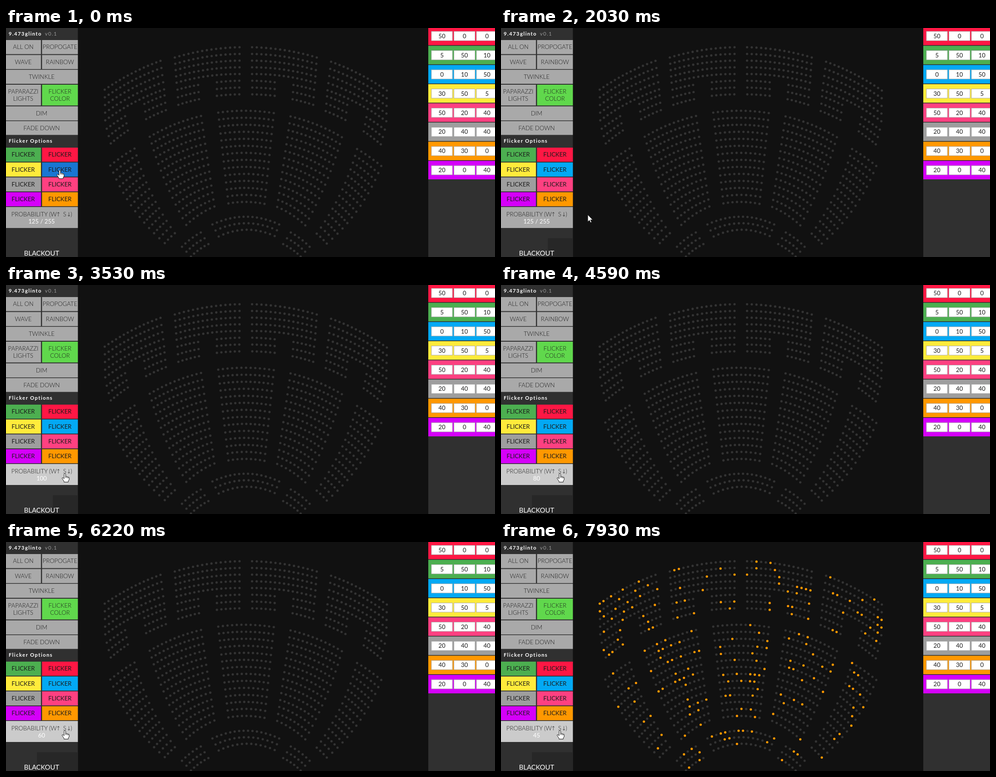
Animation of 1092x513 px, one loop 8000 ms. Source, as an HTML page with a canvas:

```html
<!DOCTYPE html>
<html lang="en">
<head>
<meta charset="utf-8">
<title>Seat lights</title>
<style>
  html, body { margin: 0; width: 100%; height: 100%; overflow: hidden; background: #111; }
  canvas, svg { position: absolute; left: 0; top: 0; width: 1092px; height: 513px; }
  text { font: 13.33px Lato, "Open Sans", sans-serif; fill: #1c1c1c; }
  .mid { text-anchor: middle; }
  .thin { font-weight: 300; }
  .head { font-size: 11.5px; font-weight: 700; letter-spacing: 1.4px; fill: #fff; }
  .version { font-weight: 400; fill: #999; }
  .white { fill: #fff; }
  .big { font-size: 15px; }
  .arrow { font-family: "DejaVu Sans", sans-serif; font-size: 13px; }
</style>
</head>
<body>
<canvas id="seats" width="1092" height="513"></canvas>
<svg id="ui" viewBox="0 0 1092 513">
  <rect width="160.5" height="513" fill="#303030"/>
  <rect x="943" width="149" height="513" fill="#303030"/>
  <rect id="shade" y="471" height="42" fill="#272727"/>
  <text class="head" x="6" y="16.5">9.473glinto</text>
  <text class="head version" x="87" y="16.5">v0.1</text>
  <text class="head" x="6" y="257">Flicker Options</text>
  <g id="panel"></g>
  <text class="thin" x="12" y="421.5">PROBABILITY (W</text>
  <text class="thin mid arrow" x="117" y="421.5">↑</text>
  <text class="thin mid" x="131" y="421.5">S</text>
  <text class="thin mid arrow" x="140.5" y="421.5">↓</text>
  <text class="thin mid" x="146" y="421.5">)</text>
  <text id="level" class="mid white" x="79.5" y="438"></text>
  <text class="mid white big" x="79.5" y="509.5">BLACKOUT</text>
  <g id="cursor" stroke="#111" fill="#fff" stroke-linejoin="round">
    <path id="hand" d="M-1.7 1.5Q0-1 1.7 1.5V7Q3.5 5.8 4.6 7.6Q6.4 6.6 7.2 8.4Q9.4 7.6 9.6 10V14L7.6 17V19.5H-2V17.5L-6.2 11.5Q-6.4 8.8-3.8 10L-1.7 12ZM1.7 7V10M4.6 8V10.5M7.2 9V11"/>
    <path id="pointer" stroke-width=".8" d="M0 0V15.5L3.6 12.2L6 17.6L8.4 16.6L6 11.4H11Z"/>
  </g>
</svg>
<script>
const LOOP = 8000;
const $ = id => document.getElementById(id);
const panel = $("panel");

function add(tag, attrs, label) {
  const el = document.createElementNS("http://www.w3.org/2000/svg", tag);
  for (const key in attrs) el.setAttribute(key, attrs[key]);
  if (label !== undefined) el.textContent = label;
  return panel.appendChild(el);
}
const box = (x, y, width, height, fill) => add("rect", { x, y, width, height, fill });
const label = (text, x, y, cls = "") => add("text", { x, y: y + 4.7, class: "mid " + cls }, text);

// Side panel buttons
const GREY = "#a9a9a9";
function button(lines, col, y, h, fill = GREY, cls = "thin") {
  const [x, w, mid] = [[0, 78, 38.5], [80.5, 80, 120.5], [0, 160.5, 79.5]][col];
  const rect = box(x, y, w, h, fill);
  lines.forEach((s, i) => label(s, mid, y + h / 2 + (i - (lines.length - 1) / 2) * 15.2, cls));
  return { rect, fill, x, y, w, h };
}
button(["ALL ON"], 0, 27, 31.5);
button(["PROPOGATE"], 1, 27, 31.5);
button(["WAVE"], 0, 60.5, 31.5);
button(["RAINBOW"], 1, 60.5, 31.5);
button(["TWINKLE"], 2, 93.5, 31.5);
button(["PAPARAZZI", "LIGHTS"], 0, 127, 46.5);
button(["FLICKER", "COLOR"], 1, 127, 46.5, "#60d84c");
button(["DIM"], 2, 175.5, 31.5);
button(["FADE DOWN"], 2, 208.5, 31);

const flick = (row, col, fill, hover) =>
  ({ ...button(["FLICKER"], col, 268 + row * 33.3, 31.5, fill, ""), hover });
const targets = [
  flick(0, 0, "#4caf50"), flick(0, 1, "#ff1744"),
  flick(1, 0, "#ffeb3b"), flick(1, 1, "#03a9f4", "#1976d2"),
  flick(2, 0, "#9e9e9e"), flick(2, 1, "#ff4081", "#f50057"),
  flick(3, 0, "#d500f9"), flick(3, 1, "#ff9800", "#f57c00"),
  { ...button([], 2, 401, 47), hover: "#cbcbcb" }
];

// Colour mixer on the right
[
  ["#ff1744", 50, 0, 0], ["#4caf50", 5, 50, 10], ["#03a9f4", 0, 10, 50], ["#ffeb3b", 30, 50, 5],
  ["#ff4081", 50, 20, 40], ["#9e9e9e", 20, 40, 40], ["#ff9800", 40, 30, 0], ["#d500f9", 20, 0, 40]
].forEach(([fill, ...parts], i) => {
  const y = i * 42.95 - 3;
  box(943, y, 149, 41.4, fill);
  parts.forEach((n, k) => {
    const x = 950 + k * 50.3;
    box(x, y + 10.7, 47, 20.6, "#fff").setAttribute("stroke", "#aaa");
    label(n, x + 23.5, y + 21);
  });
});

// Seats: curved rows around a stage centre, mirrored left to right
const seats = [];
const AXIS = 535.5;
function row(x0, y0, x1, y1, drop = 0, mirror = true) {
  const dx = x1 - x0, dy = y1 - y0, len = Math.hypot(dx, dy);
  const radius = Math.hypot((x0 + x1) / 2 - AXIS, (y0 + y1) / 2 - 600);
  const sag = len * len / (8 * radius);
  const gaps = Math.round(len / 10.2);
  for (let i = 0; i <= gaps; i++) {
    const u = i / gaps, bulge = 4 * u * (1 - u) * sag;
    const x = x0 + dx * u + dy / len * bulge;
    const y = y0 + dy * u - dx / len * bulge;
    seats.push([x, y]);
    if (mirror) seats.push([2 * AXIS - x, y + drop]);
  }
}
const rows = (n, make) => { for (let i = 0; i < n; i++) make(i); };

rows(5, i => {
  row(377 + i, 66 + 14.1 * i, 521.5, 43 + 15 * i);
  row(220.5 + .3 * i, 138 + 17.2 * i, 345 + 2 * i, 73.5 + 16 * i, 2);
});
rows(3, i => {
  row(383 + i, 138 + 17 * i, 429 + i, 127.5 + 16 * i);
  row(471, 121.5 + 15.2 * i, 521, 118 + 15.3 * i);
  row(225 + 4.5 * i, 225.5 + 16.5 * i, 266 + 3 * i, 197.5 + 16 * i, 2);
  row(309 + 2 * i, 170 + 17 * i, 354 + 1.5 * i, 151 + 16.5 * i, 2);
  row(393 + 10 * i, 490 + 11 * i, 435 + 8.5 * i, 458 + 13 * i);
  row(461 + 7 * i, 440 + 13.5 * i, 610 - 5 * i, 440 + 13 * i, 0, false);
});
rows(14, i => {
  const q = i * i;
  row(474 + 1.75 * i, 189.5 + 15.65 * i, 598 - 1.6 * i, 190.5 + 15.65 * i, 0, false);
  row(321 + 4.2 * i + .16 * q, 243.5 + 15.2 * i, 435.5 + 2.3 * i, 197 + 15.6 * i, 1);
  row(233 + 6.3 * i + .235 * q, 308 + 16.1 * i - .21 * q,
      287 + 4.2 * i + .21 * q, 270 + 15.5 * i - .07 * q, 1);
});

// Timeline
const toggles = [
  1030, 1180, 1340, 1520, 1740, 1930, 2120, 2300, 2460, 2700, 2880, 3090, 3280,
  3530, 3640, 3850, 4060, 4260, 4440, 4590, 4840, 5020, 5240, 5420, 5630, 5780,
  6020, 6220, 6370, 6580, 6790, 6940, 7170, 7330, 7560, 7770, 7930
];
const levels = [[0, 125], [2990, 100], [4440, 80], [5900, 60], [7420, 45]];
const path = [
  [0, 120, 318], [30, 120, 318], [250, 120, 378], [1030, 120, 378], [1340, 360, 405],
  [1600, 360, 405], [2080, 175, 420], [2240, 131.5, 422], [LOOP, 131.5, 422]
];

function cursorAt(t) {
  const k = path.findIndex(p => p[0] > t);
  const [a, b] = [path[k - 1], path[k]];
  const u = (t - a[0]) / (b[0] - a[0]);
  return [a[1] + (b[1] - a[1]) * u, a[2] + (b[2] - a[2]) * u];
}

function random(a, b) {
  let h = Math.imul(a + 1, 0x9e3779b1) ^ Math.imul(b + 7, 0x85ebca6b);
  h = Math.imul(h ^ h >>> 15, 0x2c1b3c6d);
  h = Math.imul(h ^ h >>> 13, 0x297a2d39);
  return ((h ^ h >>> 16) >>> 0) / 2 ** 32;
}

const ctx = $("seats").getContext("2d");
function drawSeats(flash, chance) {
  ctx.fillStyle = "#111";
  ctx.fillRect(0, 0, 1092, 513);
  seats.forEach(([x, y], i) => {
    const lit = flash % 2 && random(i, flash) < chance;
    ctx.fillStyle = lit ? "#ff9800" : "#333";
    ctx.beginPath();
    ctx.arc(x, y, 2.6, 0, 2 * Math.PI);
    ctx.fill();
  });
}

function frame() {
  const t = performance.now() % LOOP;
  const level = levels.filter(l => l[0] <= t).pop()[1];
  drawSeats(toggles.filter(s => s <= t).length, level / 255);
  $("level").textContent = level === 125 ? "125 / 255" : level;

  const [x, y] = cursorAt(t);
  $("cursor").setAttribute("transform", `translate(${x} ${y})`);
  $("hand").style.display = x < 160 ? "" : "none";
  $("pointer").style.display = x < 160 ? "none" : "";
  for (const b of targets) {
    const over = x >= b.x && x < b.x + b.w && y >= b.y && y < b.y + b.h;
    b.rect.setAttribute("fill", over && b.hover || b.fill);
  }

  const edge = t < 1030 ? 160 : t < 4440 ? 104.5 : 69;
  $("shade").setAttribute("x", edge);
  $("shade").setAttribute("width", 160.5 - edge);
  requestAnimationFrame(frame);
}
frame();
</script>
</body>
</html>
```
